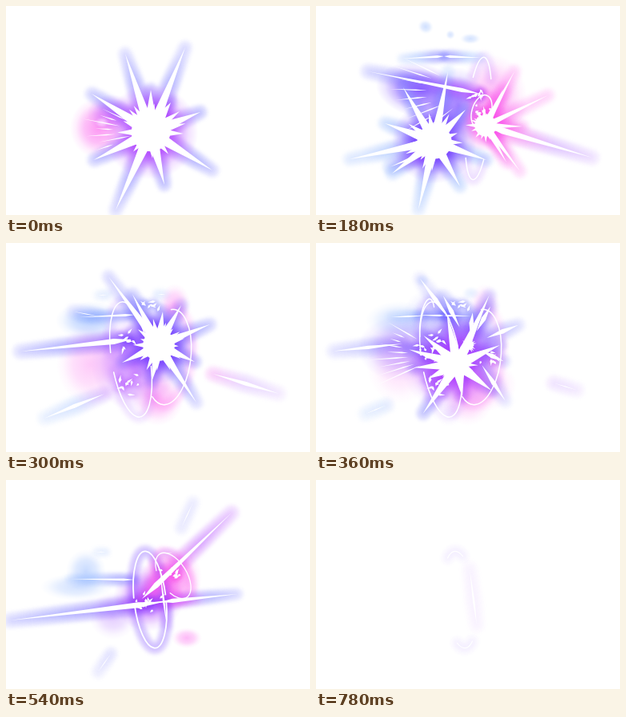
An HTML page with a canvas that plays this animation: 380 px wide and 262 px high, repeating every 840 ms.

```html
<!DOCTYPE html>
<html lang="en">
<head>
<meta charset="utf-8">
<style>
  html, body { margin: 0; width: 100%; height: 100%; overflow: hidden; background: #fff; }
  canvas { display: block; }
</style>
</head>
<body>
<canvas id="stage" width="380" height="262"></canvas>
<script>
const ctx = document.getElementById('stage').getContext('2d');
const STEP = 60, STEPS = 14;
const BLUE = '95,95,255', SKY = '120,165,255', VIOLET = '105,50,255',
      PURPLE = '170,50,255', PINK = '250,80,235', LILAC = '185,125,255';

let step, shapes, clouds, seed;
const random = () => (seed = seed * 16807 % 2147483647) / 2147483647;
const during = (first, last) => step >= first && step <= last;
const rgba = (rgb, a) => `rgba(${rgb},${a})`;

function radial(x, y, r, inner, outer) {
  const g = ctx.createRadialGradient(x, y, 0, x, y, r);
  g.addColorStop(0.25, rgba(inner, 1));
  g.addColorStop(0.65, rgba(outer, 0.85));
  g.addColorStop(1, rgba(outer, 0.5));
  return g;
}

function cloud(x, y, rx, ry, rgb, alpha, turn = 0) {
  clouds.push({ x, y, rx, ry, rgb, alpha, turn });
}

// A pointed sliver covering part of the line from (x, y) to (tx, ty).
function sliver(x, y, tx, ty, half, from, to, waist, look) {
  const dx = tx - x, dy = ty - y, len = Math.hypot(dx, dy) || 1;
  const nx = -dy / len * half, ny = dx / len * half;
  const at = k => [x + dx * k, y + dy * k];
  const [mx, my] = at(from + (to - from) * waist);
  const path = new Path2D();
  path.moveTo(...at(from));
  path.lineTo(mx + nx, my + ny);
  path.lineTo(...at(to));
  path.lineTo(mx - nx, my - ny);
  path.closePath();
  shapes.push({ path, glow: 9, alpha: 1, ...look });
}

// Life of a ray: grows, stands, leaves its root, ends as a wisp near the tip.
function ray(peak, x, y, tx, ty, half, paint, waist = 0.12, glow = 9) {
  const age = step - peak;
  if (age < -1 || age > 2) return;
  const [from, to] = [[0, 0.6], [0, 1], [0.35, 0.97], [0.64, 0.86]][age + 1];
  const gone = age === 2;
  sliver(x, y, tx, ty, gone ? 0.6 : age === 1 ? half * 0.6 : half, from, to,
    age > 0 ? 0.5 : waist, { paint, glow, alpha: gone ? 0.5 : age === 1 ? 0.65 : 1 });
}

function dart(peak, x, y, tx, ty, half, inner, outer, glow) {
  ray(peak, x, y, tx, ty, half, radial(x, y, Math.hypot(tx - x, ty - y), inner, outer), 0.16, glow);
}

function burst(peak, x, y, r, tips, inner, outer) {
  const age = step - peak;
  if (age < -1 || age > 2) return;
  const paint = radial(x, y, r * 3.8, inner, outer);
  for (const [tx, ty] of tips) {
    const len = Math.hypot(tx - x, ty - y);
    if (age < 2 || len > 120) ray(peak, x, y, tx, ty, r * 0.22, paint, r * 0.8 / len, 8);
  }
  if (age === 2) return;
  const size = [0.55, 1, 0.3][age + 1] * r;
  cloud(x, y, r * 2.2, r * 2.2, inner, age ? 0.5 : 0.9);
  seed = x * 131 + y;
  for (let i = 0; i < 17; i++) {
    const a = (i + random() * 0.7) / 17 * 2 * Math.PI, len = size * (1.1 + random() * 0.6);
    sliver(x, y, x + Math.cos(a) * len, y + Math.sin(a) * len, size * 0.16, 0, 1, 0.5, { paint, glow: 0 });
  }
  const core = new Path2D();
  core.arc(x, y, size * 0.9, 0, 7);
  shapes.push({ path: core, paint, glow: 0, alpha: 1 });
}

function arc(x, y, rx, ry, turn, start, end, rgb, alpha = 0.7, line = 1.5) {
  const path = new Path2D();
  path.ellipse(x, y, rx, ry, turn, start, end);
  shapes.push({ path, paint: rgba(rgb, 1), glow: 7, alpha, line });
}

// Two facing arcs around the ends of an upright ellipse.
function caps(x, y, rx, ry, turn, reach, rgb, alpha, line) {
  for (const mid of [-Math.PI / 2, Math.PI / 2])
    arc(x, y, rx, ry, turn, mid - reach, mid + reach, rgb, alpha, line);
}

function sparks(x, y, r, count, rgb) {
  seed = x * 97 + y;
  for (let i = 0; i < count; i++) {
    const a = random() * 6.3, d = r * random(), b = random() * 6.3, len = 3 + random() * 7;
    const sx = x + Math.cos(a) * d, sy = y + Math.sin(a) * d * 0.7;
    sliver(sx, sy, sx + Math.cos(b) * len, sy + Math.sin(b) * len, 1.5, 0, 1, 0.3,
      { paint: rgba(rgb, 1), glow: 3, alpha: 0.5 });
  }
}

// Fine white streaks fanning out through a cloud.
function fan(x, y, angle, spread, near, far, count) {
  seed = x * 53 + y;
  for (let i = 0; i < count; i++) {
    const a = angle + (i / (count - 1) - 0.5) * spread, c = Math.cos(a), s = Math.sin(a);
    const start = near + (far - near) * random() * 0.4, len = far * (0.7 + random() * 0.3);
    sliver(x + c * start, y + s * start, x + c * len, y + s * len, 0.8, 0, 1, 0.3, { paint: '#fff', glow: 0 });
  }
}

function opening() {
  burst(0, 181, 158, 27, [[149, 60], [224, 52], [243, 133], [258, 206], [198, 224], [137, 256],
    [107, 110], [181, 105], [206, 121], [110, 193]], PURPLE, BLUE);
  if (during(0, 1)) {
    const a = step ? 0.4 : 1;
    cloud(116, 153, 36, 38, PINK, 0.6 * a);
    cloud(133, 135, 32, 24, PURPLE, 0.5 * a);
    cloud(120, 146, 9, 7, '255,225,255', 0.8 * a);
    fan(181, 158, Math.PI, 0.9, 25, 92, 8);
  }
}

function doubleBurst() {
  if (during(2, 4)) {
    const a = step === 3 ? 1 : 0.6;
    cloud(130, 106, 56, 34, VIOLET, 0.75 * a, 0.2);
    cloud(178, 125, 34, 48, VIOLET, 0.6 * a);
    cloud(222, 115, 42, 54, PINK, 0.42 * a);
    fan(198, 108, Math.PI - 0.1, 1.1, 30, 112, 9);
    caps(203, 141, 15, 77, 0.09, 0.85, LILAC, 0.5 * a);
    arc(207, 132, 12, 21, 0.3, 0, 6.3, PINK, 0.6 * a);
    sparks(203, 108, 13, 8, PURPLE);
    sparks(208, 134, 15, 12, PINK);
  }
  if (during(2, 3)) {
    cloud(137, 26, 10, 9, SKY, 0.35, 0.4);
    cloud(168, 36, 6, 6, SKY, 0.3);
    cloud(193, 41, 13, 7, SKY, 0.32);
  }
  dart(3, 205, 110, 65, 82, 2.6, PURPLE, BLUE);
  dart(3, 160, 63, 108, 66, 1.6, BLUE, SKY, 6);
  dart(3, 160, 63, 206, 65, 1.6, BLUE, SKY, 6);
  burst(3, 212, 150, 15, [[290, 112], [255, 207], [248, 82], [258, 151], [234, 104], [238, 196]], PINK, PINK);
  dart(step < 4 ? 3 : 4, 212, 150, 345, 190, 4, PINK, LILAC);
  burst(3, 148, 170, 24, [[165, 82], [109, 102], [86, 147], [42, 192], [128, 255], [180, 226],
    [213, 193], [95, 210], [187, 130]], VIOLET, SKY);
}

function middleBurst() {
  if (during(4, 6)) {
    const a = step === 5 ? 1 : 0.65;
    cloud(105, 152, 42, 50, PINK, 0.3 * a);
    cloud(104, 97, 42, 24, SKY, 0.5 * a);
    cloud(160, 150, 54, 60, PURPLE, 0.6 * a);
    cloud(190, 195, 32, 34, PINK, 0.42 * a);
    cloud(211, 78, 20, 27, PINK, 0.35 * a);
    caps(156, 146, 24, 73, -0.16, 1.4, LILAC, 0.45 * a);
    arc(203, 143, 28, 60, 0.12, -1.7, 2.1, PINK, 0.4 * a);
    sparks(150, 123, 14, 10, VIOLET);
    sparks(150, 176, 22, 11, PURPLE);
    sparks(180, 78, 16, 7, BLUE);
  }
  dart(5, 157, 121, 18, 136, 3.5, VIOLET, BLUE);
  dart(4, 165, 172, 45, 221, 4, PURPLE, SKY);
  dart(5, 160, 90, 92, 93, 1.6, BLUE, SKY, 6);
  burst(5, 191, 128, 22, [[128, 42], [158, 64], [255, 102], [238, 200], [219, 78], [236, 149],
    [182, 174], [145, 150], [196, 86]], VIOLET, BLUE);
}

function greatBurst() {
  if (during(6, 8)) {
    const a = step === 7 ? 1 : 0.5;
    cloud(108, 132, 56, 42, VIOLET, 0.75 * a);
    cloud(150, 97, 44, 42, BLUE, 0.6 * a);
    cloud(207, 178, 44, 34, PINK, 0.6 * a);
    cloud(133, 47, 10, 9, SKY, 0.4 * a);
    cloud(194, 63, 12, 9, SKY, 0.35 * a);
    cloud(170, 211, 13, 13, LILAC, 0.4 * a);
    fan(160, 140, Math.PI + 0.05, 0.95, 30, 100, 9);
    arc(139, 102, 9, 32, 0.1, 2.6, 5.5, LILAC, 0.4 * a);
    sparks(136, 137, 15, 9, VIOLET);
    sparks(218, 145, 14, 7, PINK);
  }
  dart(7, 160, 91, 105, 90, 1.1, BLUE, SKY, 5);
  dart(7, 160, 91, 216, 92, 1.1, BLUE, SKY, 5);
  burst(7, 177, 152, 28, [[155, 50], [243, 8], [265, 112], [248, 207], [187, 220], [105, 255],
    [106, 92], [76, 121], [86, 159], [115, 182]], PURPLE, BLUE);
}

function closing() {
  if (!during(8, 13)) return;
  const fade = [0.7, 1, 0.75, 0.5, 0.32, 0.22][step - 8];
  const reach = [1.5, 1.5, 1.25, 0.95, 0.7, 0.5][step - 8];
  if (step < 11) {
    const a = step === 10 ? 0.5 : 1;
    cloud(178, 148, 44, 42, PURPLE, 0.7 * a);
    cloud(207, 122, 38, 40, PINK, 0.5 * a);
    cloud(100, 114, 25, 27, SKY, 0.4 * a);
    cloud(88, 134, 45, 17, SKY, 0.32 * a);
    cloud(134, 170, 30, 30, LILAC, 0.4 * a);
    cloud(226, 198, 19, 13, PINK, 0.4 * a);
    sparks(178, 153, 17, 13, VIOLET);
    sparks(206, 117, 13, 9, PINK);
  }
  caps(180, 150, 20, 61, -0.11, reach, VIOLET, fade * 0.7, step < 11 ? 1.8 : 1.2);
  if (step < 12) {
    arc(209, 120, 17, 32, -0.55, step < 11 ? -2.6 : -0.9, step < 11 ? 2.6 : 1.5, PINK, fade * 0.7, 1.3);
    cloud(198, 132, 33, 36, PINK, fade * 0.5);
    sliver(146, 157, 237, 149, 1, 0, 1, 0.6, { paint: rgba(PINK, 1), glow: 6, alpha: fade * 0.55 });
    sparks(170, 156, 9, 4, PINK);
    sparks(208, 114, 7, 4, PINK);
  }
  sliver(192, 111, 201, 182, 1.3, 0, 1, 0.58,
    { paint: rgba(LILAC, 1), glow: step > 11 ? 9 : 6, alpha: fade * 0.8 });
  dart(9, 196, 153, 5, 176, 3.5, VIOLET, BLUE);
  dart(9, 193, 153, 289, 143, 2.6, PURPLE, BLUE, 7);
  dart(9, 170, 149, 282, 41, 3.5, PINK, PURPLE);
  dart(9, 160, 125, 80, 124, 1.4, BLUE, SKY, 6);
}

function paintCloud({ x, y, rx, ry, rgb, alpha, turn }) {
  ctx.save();
  ctx.translate(x, y);
  ctx.rotate(turn);
  ctx.scale(rx, ry);
  const g = ctx.createRadialGradient(0, 0, 0, 0, 0, 1);
  g.addColorStop(0, rgba(rgb, alpha));
  g.addColorStop(0.5, rgba(rgb, alpha * 0.6));
  g.addColorStop(0.8, rgba(rgb, alpha * 0.16));
  g.addColorStop(1, rgba(rgb, 0));
  ctx.fillStyle = g;
  ctx.fillRect(-1, -1, 2, 2);
  ctx.restore();
}

function paintGlow(width, strength, blur) {
  ctx.filter = `blur(${blur}px)`;
  for (const { path, paint, glow, alpha } of shapes) {
    if (!glow) continue;
    ctx.globalAlpha = alpha * strength;
    ctx.strokeStyle = paint;
    ctx.lineWidth = glow * width;
    ctx.stroke(path);
  }
  ctx.filter = 'none';
  ctx.globalAlpha = 1;
}

function paintCores() {
  ctx.fillStyle = ctx.strokeStyle = '#fff';
  for (const { path, line } of shapes) {
    ctx.lineWidth = line;
    if (line) ctx.stroke(path);
    else ctx.fill(path);
  }
}

function draw() {
  shapes = [];
  clouds = [];
  ctx.fillStyle = '#fff';
  ctx.fillRect(0, 0, 380, 262);
  ctx.lineJoin = ctx.lineCap = 'round';
  opening();
  doubleBurst();
  middleBurst();
  greatBurst();
  closing();
  paintGlow(2.3, 0.19, 2);
  clouds.forEach(paintCloud);
  paintGlow(1, 0.4, 3.5);
  paintCores();
}

function tick() {
  const now = Math.floor(performance.now() / STEP) % STEPS;
  if (now !== step) {
    step = now;
    draw();
  }
  requestAnimationFrame(tick);
}
tick();
</script>
</body>
</html>
```
